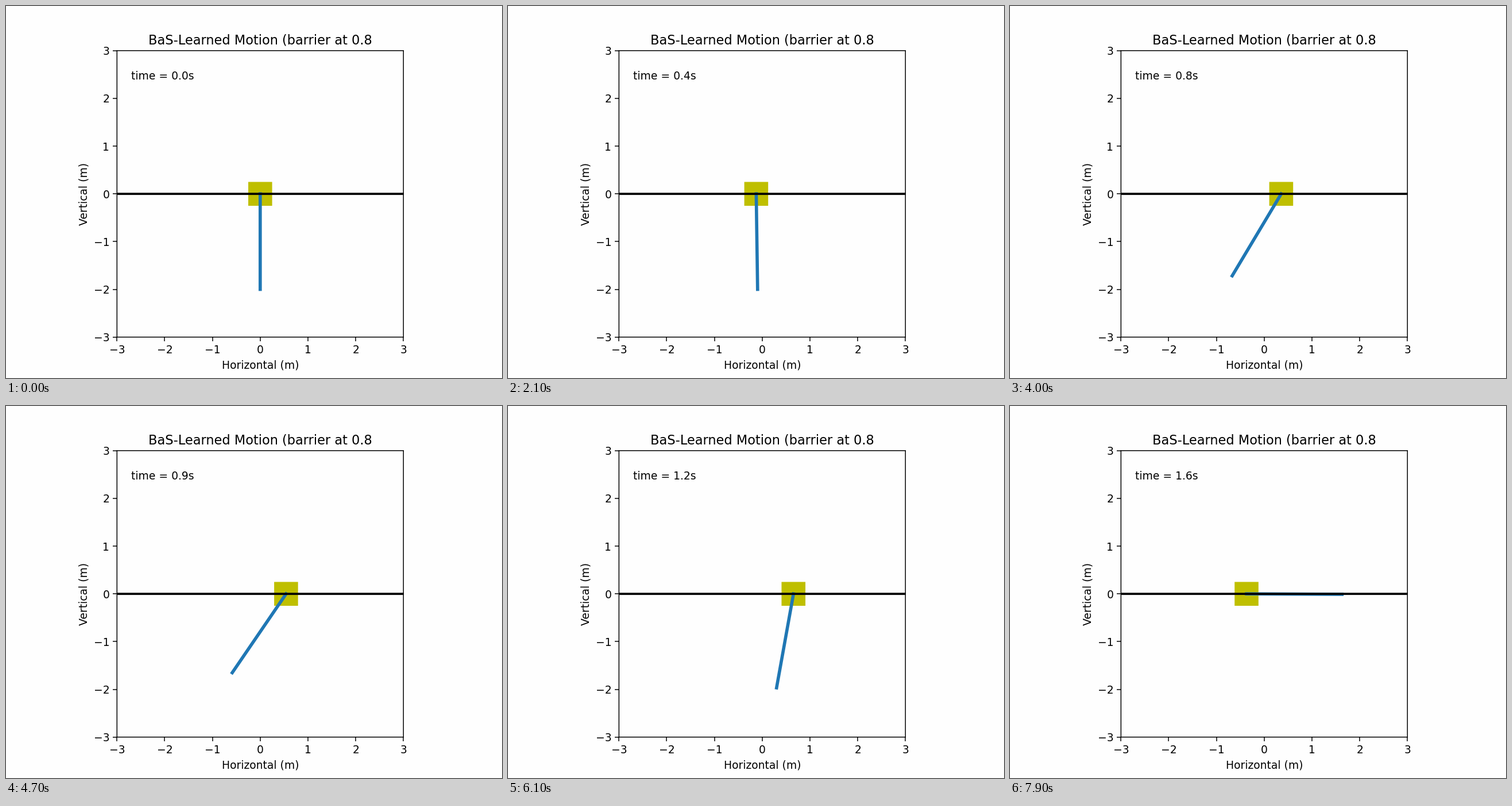
Recreate the animation shown at these times as a matplotlib script. Size 864 by 648 pixels, loop 8 s.

```python
import numpy as np
import matplotlib.pyplot as plt
from matplotlib.animation import FuncAnimation
from matplotlib.patches import Rectangle

DT = 0.02
FRAMES = 80
POLE = 2.0
CART = 0.5

# Key poses: time (s), cart position (m), pole angle from straight down (rad)
KEYS = np.array([
    (0.02, 0.0, 0.0),
    (0.22, -0.342, 0.322),
    (0.40, -0.165, 0.065),
    (0.56, 0.125, -0.304),
    (0.80, 0.356, -0.539),
    (1.10, 0.702, -0.493),
    (1.28, 0.545, 0.075),
    (1.46, -0.045, 1.056),
    (1.58, -0.370, 1.566),
])


def key_speeds(t, y):
    """Speeds that make the path smooth: at rest first, free at the end."""
    n = len(t)
    h = np.diff(t)
    slope = np.diff(y, axis=0) / h[:, None]
    a, b = np.zeros((n, n)), np.zeros_like(y)
    a[0, 0] = 1
    for i in range(1, n - 1):
        a[i, i - 1:i + 2] = h[i], 2 * (h[i - 1] + h[i]), h[i - 1]
        b[i] = 3 * (h[i] * slope[i - 1] + h[i - 1] * slope[i])
    a[-1, -2:] = 1, 2
    b[-1] = 3 * slope[-1]
    return np.linalg.solve(a, b)


TIMES, POSES = KEYS[:, 0], KEYS[:, 1:]
SPEEDS = key_speeds(TIMES, POSES)


def pose(s):
    """Cart position and pole angle at time s, cubic between the keys."""
    s = np.clip(s, TIMES[0], TIMES[-1])
    i = min(np.searchsorted(TIMES, s, side="right") - 1, len(TIMES) - 2)
    h = TIMES[i + 1] - TIMES[i]
    u = (s - TIMES[i]) / h
    w = 1 - u
    return (POSES[i] * w * w * (1 + 2 * u) + POSES[i + 1] * u * u * (1 + 2 * w)
            + h * u * w * (SPEEDS[i] * w - SPEEDS[i + 1] * u))


plt.rcParams.update({"font.family": "DejaVu Sans", "path.snap": False})
fig = plt.figure(figsize=(6.4, 4.8), dpi=135, facecolor="#fefefe")
ax = fig.add_subplot(aspect="equal", xlim=(-3, 3), ylim=(-3, 3),
                     facecolor="#fefefe")
ax.set_title("BaS-Learned Motion (barrier at 0.8")
ax.set_xlabel("Horizontal (m)")
ax.set_ylabel("Vertical (m)")

cart = ax.add_patch(Rectangle((-CART / 2, -CART / 2), CART, CART, fc="y", lw=0))
pole, = ax.plot([], [], color="C0", lw=3)
ax.axhline(0, color="k", lw=2)
clock = ax.text(0.05, 0.9, "", transform=ax.transAxes)


def draw(n):
    t = n * DT
    x, angle = pose(t)
    cart.set_x(x - CART / 2)
    pole.set_data([x, x + POLE * np.sin(angle)], [0, -POLE * np.cos(angle)])
    clock.set_text(f"time = {t:.1f}s")
    return cart, pole, clock


anim = FuncAnimation(fig, draw, frames=FRAMES, interval=100,
                     init_func=lambda: draw(0), repeat=True)
plt.show()
```
